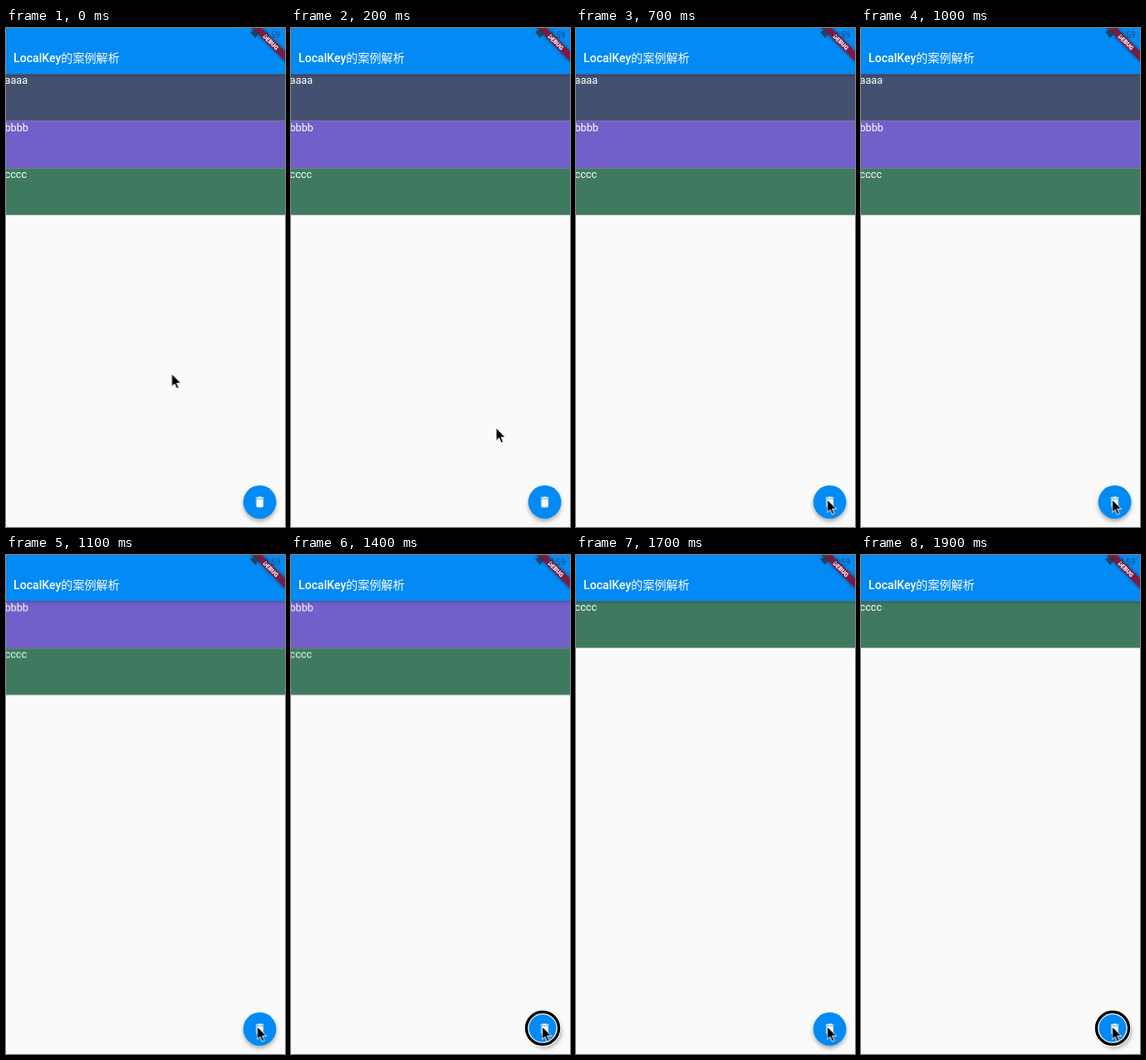
Recreate the animation shown at these times as an HTML page. Size 336 by 599 pixels, loop 2 s.

```html
<!DOCTYPE html>
<html lang="zh">
<head>
<meta charset="utf-8">
<title>LocalKey</title>
<style>
  html, body { margin: 0; width: 100%; height: 100%; overflow: hidden; background: #fafafa; }
  svg { display: block; width: 100%; height: 100%; }
  text { fill: #fff; font-family: Roboto, "Noto Sans CJK SC", "Noto Sans CJK", sans-serif; }
  .row text { font-size: 12.7px; }
  .title { font-size: 14.1px; font-weight: 500; }
  .title tspan { font-weight: 400; }
  .bar { filter: drop-shadow(0 1.5px 1.5px rgba(0, 0, 0, .35)); }
  .fab { filter: drop-shadow(0 3px 2.5px rgba(0, 0, 0, .32)); }
  .debug { font-size: 7.2px; font-weight: 900; text-anchor: middle; }
  .ribbon { filter: drop-shadow(0 0 2px rgba(0, 0, 0, .45)); }
  .clock { font-size: 10px; fill: #26384f; opacity: .8; }

  .list, .cursor, .ring, .ripple { animation: 2s step-end infinite; }
  .list { animation-name: remove; }
  .cursor { animation-name: travel; }
  .ring { animation-name: click; }
  .ripple { animation-name: ripple; }

  @keyframes remove {
    0% { transform: translateY(0); }
    55% { transform: translateY(-56.5px); }
    75%, 100% { transform: translateY(-113px); }
  }
  @keyframes travel {
    0% { transform: translate(199.5px, 415px); }
    5% { transform: translate(215px, 436px); }
    10% { transform: translate(247px, 480px); }
    15% { transform: translate(278px, 523px); }
    20% { transform: translate(293px, 543px); }
    25% { transform: translate(300px, 558px); }
    30%, 100% { transform: translate(302.5px, 566px); }
  }
  @keyframes click {
    0%, 75% { opacity: 0; }
    70%, 95%, 100% { opacity: 1; }
  }
  @keyframes ripple {
    0%, 85%, 100% { opacity: 0; }
    75% { opacity: .2; }
    80% { opacity: .08; }
  }
</style>
</head>
<body>
<svg viewBox="0 0 336 599">
  <rect width="336" height="599" fill="#fafafa"/>

  <g class="list">
    <g class="row" transform="translate(0 55.2)">
      <rect width="336" height="56.5" fill="#435070"/><text x="-1.5" y="11.8">aaaa</text>
    </g>
    <g class="row" transform="translate(0 111.7)">
      <rect width="336" height="56.5" fill="#735fc9"/><text x="-1.5" y="11.8">bbbb</text>
    </g>
    <g class="row" transform="translate(0 168.2)">
      <rect width="336" height="56.3" fill="#3f7a60"/><text x="-1.5" y="11.8">cccc</text>
    </g>
  </g>

  <rect class="bar" x="-6" y="-6" width="348" height="61.2" fill="#028af5"/>
  <text class="title" x="9" y="41">LocalKey<tspan>的案例解析</tspan></text>

  <!-- debug ribbon and status icons -->
  <g transform="translate(336 0) rotate(45)">
    <rect class="ribbon" x="-29" y="19.8" width="58" height="8.5" fill="#7b1b42"/>
    <text class="debug" x="0" y="26.6">DEBUG</text>
  </g>
  <path d="M294 5Q300 0 306 5L300 12Z" fill="#26384f" opacity=".85"/>
  <text class="clock" x="311" y="11.5">4:59</text>

  <g class="fab"><circle cx="305.6" cy="569" r="19.9" fill="#028af5"/></g>
  <circle class="ripple" cx="305.6" cy="569" r="19.9" fill="#fff"/>
  <path transform="translate(297.1 560.5) scale(.706)" fill="#fff"
    d="M6 19c0 1.1.9 2 2 2h8c1.1 0 2-.9 2-2V7H6zM19 4h-3.5l-1-1h-5l-1 1H5v2h14z"/>

  <g class="ring" fill="none">
    <circle cx="303" cy="568" r="19.5" stroke="#fafafa" stroke-width="6"/>
    <circle cx="303" cy="568" r="19.5" stroke="#000" stroke-width="3.4"/>
  </g>

  <g class="cursor">
    <path d="M0 0V15.5L3.6 12.2L6 18L8.6 16.9L6.2 11.3H11Z" fill="#000"
      stroke="#fff" stroke-width="1" stroke-linejoin="round"/>
  </g>
</svg>
</body>
</html>
```
